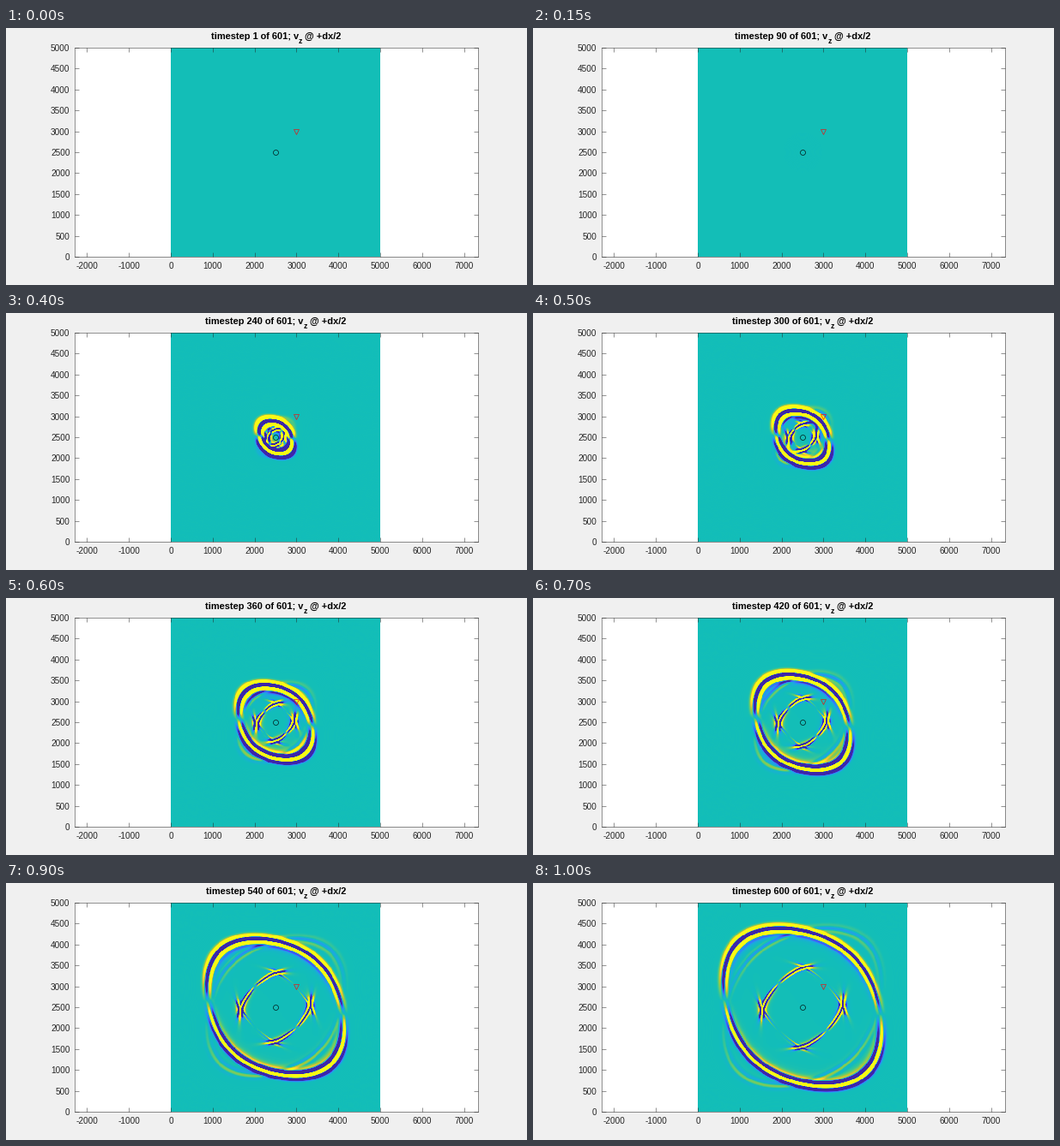
These frames come from a looping animation (607 by 300 pixels, 1.05 s). A matplotlib script:

```python
import numpy as np
import matplotlib.pyplot as plt
from matplotlib.animation import FuncAnimation
from matplotlib.colors import LinearSegmentedColormap

W, H, DPI = 607, 300, 100
FRAMES, STEP = 21, 30
PT = 72 / DPI                      # points per pixel

plt.rcParams["font.family"] = "Liberation Sans"
plt.rcParams["axes.unicode_minus"] = False

# Tilted anisotropic medium, in (metres per step)^2, along its own axes
C11, C33, C55, C13 = 23.3, 14.4, 3.17, 8.83
N, DX = 512, 10.0                  # periodic grid around the shot
FREQ, DELAY = 0.02, 150            # Ricker wavelet, in steps
GHOST = 0.045                      # weak mirrored grid mode
CLIP = 0.12                        # colour limit relative to the P peak


def ricker(t):
    a = (np.pi * FREQ * (t - DELAY)) ** 2
    return (1 - 2 * a) * np.exp(-a)


def wave_modes():
    """Frequency and vertical shot response of the qP and qS modes."""
    kx = 2 * np.pi * np.fft.rfftfreq(N, DX)[None, :]
    ky = 2 * np.pi * np.fft.fftfreq(N, DX)[:, None]
    k1, k3 = (kx - ky) / np.sqrt(2), (kx + ky) / np.sqrt(2)
    g11 = C11 * k1**2 + C55 * k3**2
    g33 = C33 * k3**2 + C55 * k1**2
    g13 = (C13 + C55) * k1 * k3
    mean = (g11 + g33) / 2
    split = np.sqrt(((g11 - g33) / 2) ** 2 + g13**2)
    split[0, 0] = 1
    taper = np.exp(-((kx**2 + ky**2) / 0.04) ** 4)
    modes = []
    for sign in (1, -1):
        other = mean - sign * split
        w1 = g11 * k1 + g13 * k3 - other * k1
        w3 = g13 * k1 + g33 * k3 - other * k3
        response = 1j * taper * (w3 - w1) / (sign * 2 * split * np.sqrt(2))
        omega = np.sqrt(np.maximum(mean + sign * split, 1e-12))
        modes.append((omega, response / omega))
    return modes


def simulate():
    """Vertical velocity snapshots every STEP time steps."""
    modes = wave_modes()
    drive = [[np.zeros_like(w), np.zeros_like(w)] for w, _ in modes]
    fields = []
    for t in range(0, (FRAMES - 1) * STEP + 1, 2):
        s = ricker(t)
        if abs(s) > 1e-6:
            for (omega, _), acc in zip(modes, drive):
                acc[0] += s * np.cos(omega * t)
                acc[1] += s * np.sin(omega * t)
        if t % STEP == 0:
            spec = sum(
                r * (np.sin(w * t) * c - np.cos(w * t) * q)
                for (w, r), (c, q) in zip(modes, drive)
            )
            v = np.fft.fftshift(np.fft.irfft2(spec, s=(N, N)))[6:507, 6:507]
            fields.append(v + GHOST * v[:, ::-1])
    limit = CLIP * np.abs(fields[-1][380:, 250]).max()
    return [v / limit for v in fields]


parula = LinearSegmentedColormap.from_list("parula", [
    (0.242, 0.150, 0.660), (0.281, 0.323, 0.958), (0.179, 0.529, 0.968),
    (0.109, 0.667, 0.873), (0.070, 0.746, 0.726), (0.396, 0.803, 0.428),
    (0.672, 0.779, 0.223), (0.997, 0.766, 0.220), (0.977, 0.984, 0.081),
])

fields = simulate()

fig = plt.figure(figsize=(W / DPI, H / DPI), dpi=DPI, facecolor="#f0f0f0")
left, right, top, bottom = 79.5, 549.5, 23, 267
ax = fig.add_axes([left / W, 1 - bottom / H, (right - left) / W, (bottom - top) / H])
image = ax.imshow(fields[0], cmap=parula, vmin=-1, vmax=1, origin="lower",
                  extent=(0, 5000, 0, 5000), aspect="auto",
                  interpolation="nearest", zorder=1)

# 244 pixels span 5000 m, and x = 0 lies at pixel 192
scale = 5000 / 244
ax.set_xlim((left - 192) * scale, (right - 192) * scale)
ax.set_ylim(0, 5000)
ax.set_xticks(range(-2000, 7001, 1000))
ax.set_yticks(range(0, 5001, 500))
ax.set_axisbelow(False)
ink = "#262626"
ax.tick_params(direction="in", top=True, right=True, length=4.7 * PT,
               width=0.5 * PT, color=ink, labelcolor=ink, labelsize=10 * PT)
ax.tick_params(axis="x", pad=6 * PT)
ax.tick_params(axis="y", pad=5 * PT)
for spine in ax.spines.values():
    spine.set(linewidth=0.5 * PT, color=ink)

ax.plot(2500, 2500, "o", ms=6 * PT, mfc="none", mec="black", mew=0.6 * PT, zorder=4)
ax.plot(3000, 3000, "v", ms=6 * PT, mfc="none", mec="red", mew=0.6 * PT, zorder=4)


def label(text, y, size, ha):
    return fig.text(0, 1 - y / H, text, size=size * PT, weight="bold",
                    ha=ha, va="baseline", color="black")


head = label("", 13, 11, "right")
sub = label("z", 18.5, 8.8, "left")
tail = label("@ +dx/2", 13, 11, "left")


def update(i):
    step = max(1, i * STEP)
    image.set_data(fields[i])
    head.set_text(f"timestep {step} of 601; v")
    x = 346.8 - 3.06 * (3 - len(str(step)))   # keeps the title centred
    for part, shift in ((head, 0), (sub, 0.3), (tail, 7.5)):
        part.set_x((x + shift) / W)
    return image, head, sub, tail


anim = FuncAnimation(fig, update, frames=FRAMES, interval=50,
                     repeat=True, repeat_delay=0, blit=False)
plt.show()
```
